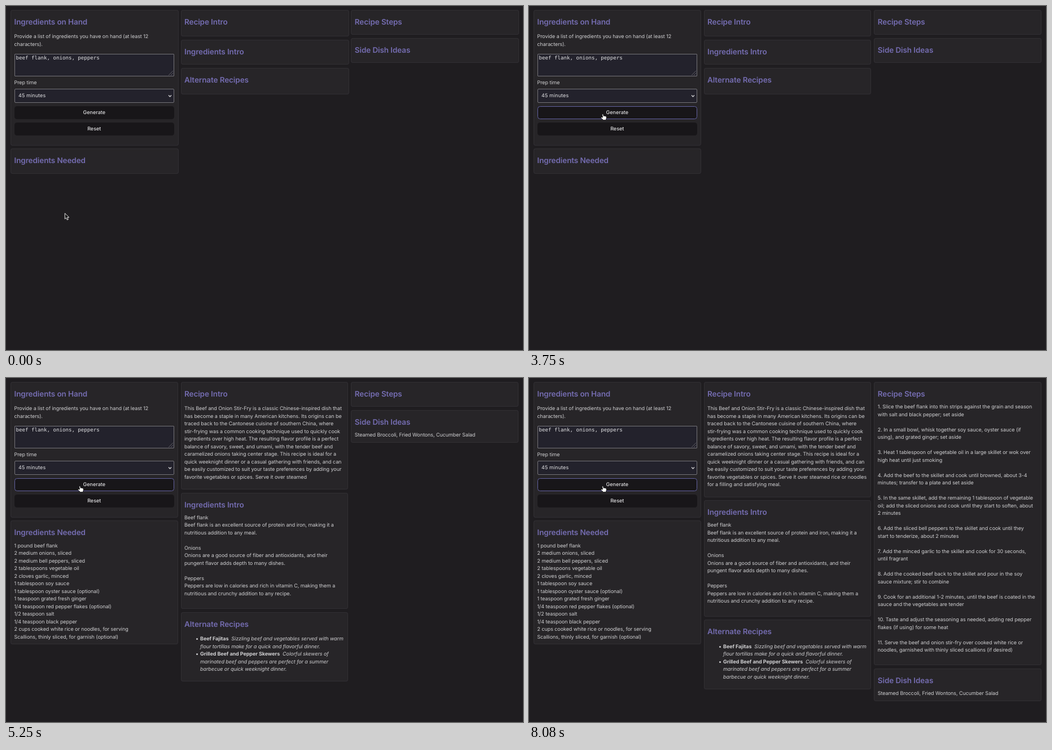
An HTML page that plays this animation: 916x611 px, repeating every 8.16 s.

```html
<!DOCTYPE html>
<html lang="en">
<head>
<meta charset="utf-8">
<title>Recipe generator</title>
<style>
  html, body { margin: 0; width: 100%; height: 100%; overflow: hidden; background: #1f1d20; }
  body {
    position: relative;
    font: 9px/13.5px Inter, "Open Sans", sans-serif;
    letter-spacing: -.07px;
    color: #cfcfd1;
    text-rendering: geometricPrecision;
    -webkit-font-smoothing: antialiased;
  }
  .col { position: absolute; top: 7px; width: 298px; }
  .settled .col { width: 296.8px; }
  .card {
    position: relative; box-sizing: border-box;
    margin-bottom: 5.6px; padding: 0 6.5px 6.2px;
    border-radius: 4px; background: #272528;
    box-shadow: inset 0 0 0 1px #312f33;
  }
  h2 {
    margin: 0; height: 38.2px;
    font-size: 13.5px; line-height: 44.4px; font-weight: 600;
    letter-spacing: -.1px; color: #746cb0;
  }
  .text { white-space: pre; }
  .roomy { min-height: 47.4px; }
  .roomy .text:not(:empty) { padding: 3.2px 0 8.6px; }
  .item { position: relative; padding-left: 28px; }
  .item::before {
    content: ""; position: absolute; left: 21px; top: 5.4px;
    width: 3px; height: 3px; border-radius: 50%; background: #cfcfd1;
  }
  b { font-weight: 700; }

  .form { height: 240.8px; }
  .form > :not(h2) { position: absolute; left: 6.5px; box-sizing: border-box; white-space: pre; }
  .about { top: 41.2px; }
  .label { top: 123.3px; }
  .box, .button { width: 283.5px; }
  .box { border: 1px solid #747378; background: #23222c; color: #e2e2e4; }
  .area {
    top: 77.5px; height: 40.5px; padding: 1.6px 2px; border-radius: 1px;
    font: 9.13px/13.5px "DejaVu Sans Mono", monospace; letter-spacing: 0;
  }
  .select { top: 140px; height: 25.3px; padding-left: 6.5px; line-height: 23.5px; border-radius: 2px; letter-spacing: .1px; }
  .box svg { position: absolute; fill: none; stroke: #d6d6d8; }
  .area svg { right: 1px; bottom: 1px; stroke: #77767c; stroke-width: .7; }
  .select svg { right: 3.5px; top: 9px; stroke-width: 1.3; }
  .button {
    height: 23.3px; line-height: 21.3px; text-align: center;
    border: 1px solid transparent; border-radius: 4.5px;
    background: #181619 border-box; color: #dfdfe1; font-weight: 500; letter-spacing: 0;
  }
  .hover .go { border-color: #62619f; }

  .cursor { position: absolute; left: 0; top: 0; overflow: visible; }
  .hand, .hover .arrow { display: none; }
  .hover .hand { display: inline; }
</style>
</head>
<body>
<div class="col" style="left:8px">
  <div class="card form">
    <h2>Ingredients on Hand</h2>
    <div class="about">Provide a list of ingredients you have on hand (at least 12
characters).</div>
    <div class="box area">beef flank, onions, peppers<svg width="8" height="8"><path d="M0 8L8 0M4 8L8 4"/></svg></div>
    <div class="label">Prep time</div>
    <div class="box select">45 minutes<svg width="7" height="6"><path d="M1 1.5L3.5 4L6 1.5"/></svg></div>
    <div class="button go" style="top:170.7px">Generate</div>
    <div class="button" style="top:199.5px">Reset</div>
  </div>
  <div class="card"><h2>Ingredients Needed</h2><div class="text" id="needed"></div></div>
</div>
<div class="col" style="left:309.5px">
  <div class="card roomy"><h2>Recipe Intro</h2><div class="text" id="intro"></div></div>
  <div class="card"><h2>Ingredients Intro</h2><div class="text" id="about"></div></div>
  <div class="card roomy"><h2>Alternate Recipes</h2><div class="text" id="others"></div></div>
</div>
<div class="col" style="left:611.3px">
  <div class="card"><h2>Recipe Steps</h2><div class="text" id="steps"></div></div>
  <div class="card"><h2>Side Dish Ideas</h2><div class="text" id="sides"></div></div>
</div>
<svg class="cursor" id="cursor" width="12" height="16">
  <path class="arrow" d="M.5 .5V10.6L2.8 8.5L4.5 12.3L6.4 11.5L4.7 7.8H7.9Z" fill="#111" stroke="#fff" stroke-width=".9"/>
  <path class="hand" d="M-.9 .9Q0 -.5 1 .8L1.9 4L2.4 3.2Q3.4 2.9 3.8 3.8Q4.9 3.2 5.3 4.2Q6.6 3.9 6.7 5.2V7.4L5.7 10.8H.9Q-.6 8.6 -2.9 6.6Q-2.9 5.1 -1.2 5.6L.1 6.3Z" fill="#fff" stroke="#111" stroke-width=".8"/>
</svg>
<script>
const LOOP = 8160, FPS = 12;

// Each stop is [tick, last words shown by then]; "" is the start, null the whole text.
const streams = {
  needed: {
    stops: [[53, ""], [55, "vegetable oil\n2"], [59, "1/4 teaspoon black pepper"], [61, null]],
    text: `1 pound beef flank
2 medium onions, sliced
2 medium bell peppers, sliced
2 tablespoons vegetable oil
2 cloves garlic, minced
1 tablespoon soy sauce
1 tablespoon oyster sauce (optional)
1 teaspoon grated fresh ginger
1/4 teaspoon red pepper flakes (optional)
1/2 teaspoon salt
1/4 teaspoon black pepper
2 cups cooked white rice or noodles, for serving
Scallions, thinly sliced, for garnish (optional)`
  },
  intro: {
    stops: [[52, ""], [55, "Cantonese cuisine"], [59, "This recipe is"], [64, null]],
    text: `This Beef and Onion Stir-Fry is a classic Chinese-inspired dish that
has become a staple in many American kitchens. Its origins can be
traced back to the Cantonese cuisine of southern China, where
stir-frying was a common cooking technique used to quickly cook
ingredients over high heat. The resulting flavor profile is a perfect
balance of savory, sweet, and umami, with the tender beef and
caramelized onions taking center stage. This recipe is ideal for a
quick weeknight dinner or a casual gathering with friends, and can
be easily customized to suit your taste preferences by adding your
favorite vegetables or spices. Serve it over steamed rice or noodles
for a filling and satisfying meal.`
  },
  about: {
    stops: [[53, ""], [55, "Onions"], [59, null]],
    text: `Beef flank
Beef flank is an excellent source of protein and iron, making it a
nutritious addition to any meal.

Onions
Onions are a good source of fiber and antioxidants, and their
pungent flavor adds depth to many dishes.

Peppers
Peppers are low in calories and rich in vitamin C, making them a
nutritious and crunchy addition to any recipe.

`
  },
  others: {
    list: true,
    stops: [[50, ""], [54, null]],
    text: `*Beef Fajitas*  _Sizzling beef and vegetables served with warm
flour tortillas make for a quick and flavorful dinner._

*Grilled Beef and Pepper Skewers*  _Colorful skewers of
marinated beef and peppers are perfect for a summer
barbecue or quick weeknight dinner._`
  },
  steps: {
    stops: [[65, ""], [70, "until brown"], [78, "stir to combine"], [83, null]],
    text: `1. Slice the beef flank into thin strips against the grain and season
with salt and black pepper; set aside

2. In a small bowl, whisk together soy sauce, oyster sauce (if
using), and grated ginger; set aside

3. Heat 1 tablespoon of vegetable oil in a large skillet or wok over
high heat until just smoking

4. Add the beef to the skillet and cook until browned, about 3-4
minutes; transfer to a plate and set aside

5. In the same skillet, add the remaining 1 tablespoon of vegetable
oil; add the sliced onions and cook until they start to soften, about
2 minutes

6. Add the sliced bell peppers to the skillet and cook until they
start to tenderize, about 2 minutes

7. Add the minced garlic to the skillet and cook for 30 seconds,
until fragrant

8. Add the cooked beef back to the skillet and pour in the soy
sauce mixture; stir to combine

9. Cook for an additional 1-2 minutes, until the beef is coated in the
sauce and the vegetables are tender

10. Taste and adjust the seasoning as needed, adding red pepper
flakes (if using) for some heat

11. Serve the beef and onion stir-fry over cooked white rice or
noodles, garnished with thinly sliced scallions (if desired)

`
  },
  sides: {
    stops: [[50, ""], [52, null]],
    text: "Steamed Broccoli, Fried Wontons, Cucumber Salad"
  }
};

const byId = id => document.getElementById(id);
const clamp = x => Math.min(1, Math.max(0, x));
const ease = x => x * x * (3 - 2 * x);

for (const s of Object.values(streams)) {
  s.keys = s.stops.map(([tick, mark]) =>
    [tick, mark === null ? s.text.length : s.text.indexOf(mark) + mark.length]);
}

function shownLength(keys, tick) {
  let count = 0;
  for (let i = 1; i < keys.length; i++) {
    const [t0, a] = keys[i - 1], [t1, b] = keys[i];
    if (tick >= t0) count = a + (b - a) * clamp((tick - t0) / (t1 - t0));
  }
  return Math.round(count);
}

const styled = text => text
  .replace(/\*([^*]*)\*?/g, "<b>$1</b>")
  .replace(/_([^_]*)_?/g, "<i>$1</i>");

function toHtml(text, list) {
  if (!list || !text) return text;
  return text.split("\n\n").filter(Boolean)
    .map(item => `<div class="item">${styled(item)}</div>`).join("");
}

function draw(tick) {
  for (const [id, s] of Object.entries(streams)) {
    byId(id).innerHTML = toHtml(s.text.slice(0, shownLength(s.keys, tick)), s.list);
  }
  const p = ease(clamp((tick - 18) / 8));
  const x = 103.8 + 26.7 * p, y = 367.6 - 175.8 * p;
  byId("cursor").style.transform = `translate(${x}px, ${y}px)`;
  document.body.classList.toggle("hover", p > .97);
  document.body.classList.toggle("settled", tick >= 11);
}

let last = -1;
const start = performance.now();
function frame() {
  const time = Math.max(0, performance.now() - start) % LOOP;
  const tick = Math.floor((time + 5) * FPS / 1000);
  if (tick !== last) draw(last = tick);
  requestAnimationFrame(frame);
}
frame();
</script>
</body>
</html>
```
